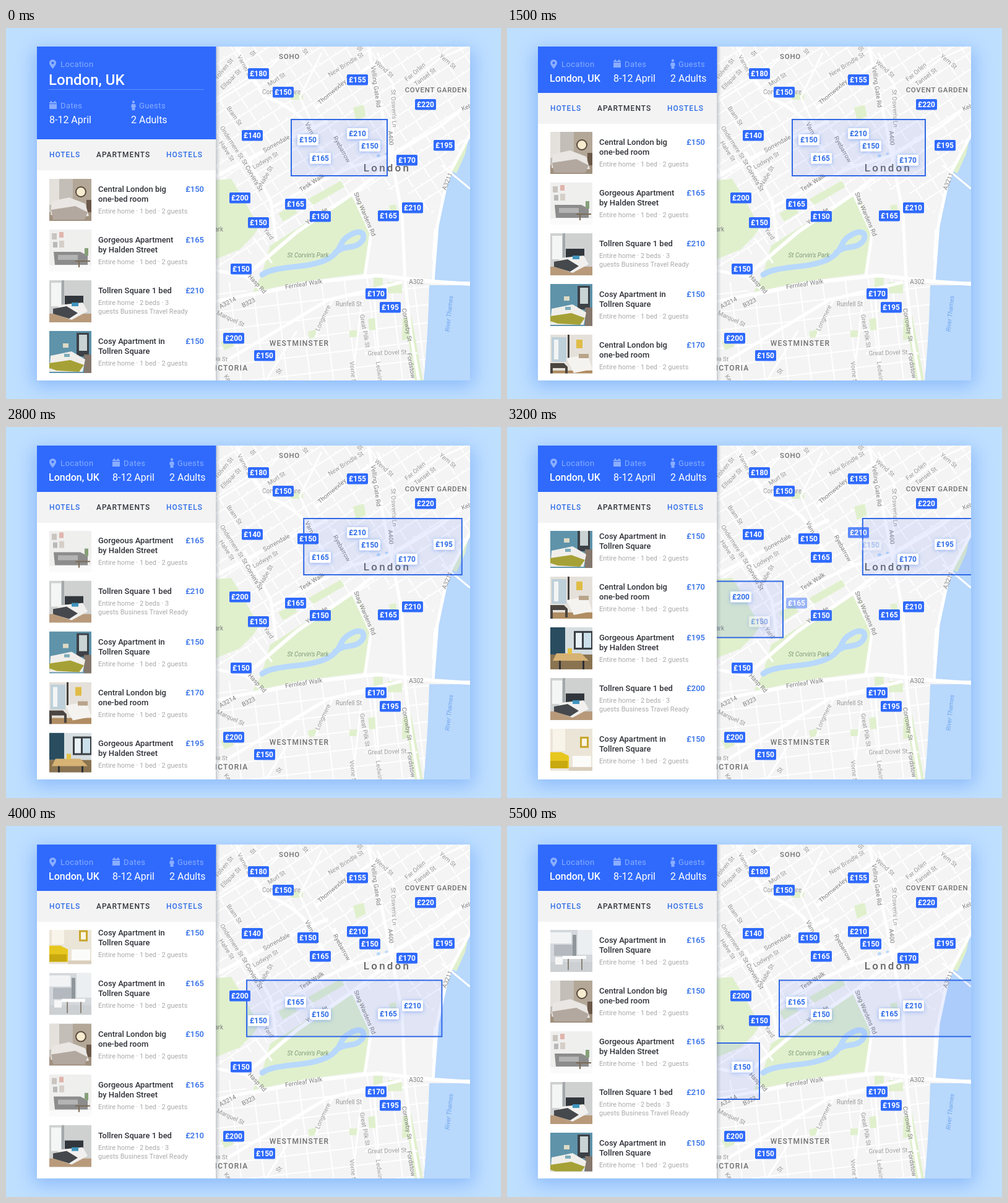
An HTML page for the animation above (5.6 s loop, 800 by 600 pixels).

```html
<!DOCTYPE html>
<html lang="en">
<head>
<meta charset="utf-8">
<title>Apartment search</title>
<style>
html, body { margin: 0; width: 100%; height: 100%; overflow: hidden; background: #bddcff; }
svg { display: block; width: 800px; height: 600px; font-family: Roboto, Inter, sans-serif; }
.street { font-size: 10px; fill: #9a9a9a; text-anchor: middle; }
.area { font-size: 11.5px; font-weight: 500; fill: #707070; letter-spacing: .7px; text-anchor: middle; }
.pill { font-size: 12px; font-weight: 700; text-anchor: middle; }
.tab { font-size: 12px; font-weight: 500; letter-spacing: 1px; fill: #2f6de8; }
.hint { font-size: 13px; fill: #8aadff; letter-spacing: .4px; }
.value { font-size: 16px; fill: #fff; }
.title { font-size: 13px; font-weight: 500; fill: #303238; }
.price { font-size: 13px; font-weight: 500; fill: #2f6de8; text-anchor: end; }
.meta { font-size: 11px; fill: #aaa; }
.road { fill: none; stroke: #fff; stroke-linejoin: round; }
</style>
</head>
<body>
<svg id="stage" viewBox="0 0 800 600">
  <defs>
    <filter id="glow" x="-20%" y="-20%" width="140%" height="140%"><feGaussianBlur stdDeviation="15"/></filter>
    <filter id="soft" x="-40%" y="-60%" width="180%" height="240%"><feDropShadow dx="0" dy="1" stdDeviation="3" flood-color="#3d74f5" flood-opacity=".5"/></filter>
    <linearGradient id="edge"><stop stop-color="#5a6478" stop-opacity=".3"/><stop offset="1" stop-color="#5a6478" stop-opacity="0"/></linearGradient>
    <pattern id="north" width="31" height="23" patternUnits="userSpaceOnUse" patternTransform="rotate(-33)"><path class="road" d="M0 4H31M9 4V23M22 4V-9" stroke-width="2"/></pattern>
    <pattern id="south" width="37" height="29" patternUnits="userSpaceOnUse" patternTransform="rotate(-7)"><path class="road" d="M0 5H37M12 0V29" stroke-width="2"/></pattern>
    <clipPath id="mapClip"><path d="M339 30H750V570H339Z"/></clipPath>
    <clipPath id="listClip"><rect id="listRect" x="50" width="289"/></clipPath>
    <clipPath id="thumbClip"><path d="M0 0H68V68H0Z"/></clipPath>
  </defs>
  <rect width="800" height="600" fill="#bfdfff"/>
  <rect x="44" y="34" width="712" height="546" fill="#6ba3f7" opacity=".6" filter="url(#glow)"/>
  <g clip-path="url(#mapClip)">
    <g id="map"></g>
    <g id="boxes"></g>
    <g id="pills"></g>
    <rect x="339" y="30" width="7" height="540" fill="url(#edge)"/>
  </g>
  <rect x="50" y="30" width="289" height="540" fill="#fff"/>
  <g clip-path="url(#listClip)"><g id="list"></g></g>
  <g id="tabs">
    <rect x="50" y="180" width="289" height="50" fill="#f3f3f3"/>
    <text class="tab" x="70" y="209">HOTELS</text>
    <text class="tab" x="146" y="209" style="fill:#33363d">APARTMENTS</text>
    <text class="tab" x="259" y="209">HOSTELS</text>
  </g>
  <rect id="head" x="50" y="30" width="289.500" fill="#2f6afd"/>
  <path id="rule" d="M69 99.500H320" stroke="#fff" stroke-opacity=".25"/>
  <path d="M75.500 51a5.500 5.500 0 0 0-5.500 5.500C70 60 75.500 66 75.500 66S81 60 81 56.500A5.500 5.500 0 0 0 75.500 51Zm0 3.500a2 2 0 1 1 0 4a2 2 0 0 1 0-4Z" fill="#8aadff"/>
  <text class="hint" x="88" y="63">Location</text>
  <text id="city" x="69" fill="#fff" font-weight="500">London, UK</text>
  <g id="dates">
    <path d="M70 121v-1h2v-2h2v2h4v-2h2v2h2v2H70ZM70 123H82V131H70Z" fill="#8aadff"/>
    <text class="hint" x="88" y="130">Dates</text>
    <text class="value" x="70" y="154">8-12 April</text>
  </g>
  <g id="guests">
    <path d="M206 117.500a2.200 2.200 0 1 1-.1 0ZM203 123H209L210 128H208.500V133H203.500V128H202Z" fill="#8aadff"/>
    <text class="hint" x="215" y="130">Guests</text>
    <text class="value" x="202" y="154">2 Adults</text>
  </g>
</svg>
<script>
const LOOP = 5600, LEFT = 339, SPAN = 411, PITCH = 82;
const BLUE = '#2f6afd';
const $ = id => document.getElementById(id);
const clamp = v => Math.max(0, Math.min(1, v));
const ramp = (t, a, b) => clamp((t - a) / (b - a));
const ease = p => p < .5 ? 4 * p ** 3 : 1 - 4 * (1 - p) ** 3;
const mix = (a, b, p) => a + (b - a) * p;

// A value that eases through moves of [start, end, target].
const track = (from, ...moves) => t => {
  let v = from;
  for (const [a, b, to] of moves) v = mix(v, to, ease(ramp(t, a, b)));
  return v;
};
const fold = track(0, [700, 1300, 1]);
const selStart = track(460, [1874, 2474, 480], [2740, 3830, 790], [3850, 4300, 850]);
const selEnd = track(617, [700, 1300, 677], [1874, 2474, 737], [2710, 3830, 1096], [3850, 4300, 1231]);
const scroll = track(0, [1874, 2474, PITCH], [2699, 3830, 7 * PITCH], [3850, 4300, 8 * PITCH]);

// ---- Map ----
const road = (w, d) => `<path class="road" stroke-width="${w}" d="${d}"/>`;
const area = (c, d) => `<path fill="${c}" d="${d}"/>`;
const street = (s, x, y, a = 0, style = '') =>
  `<text class="street" style="${style}" transform="translate(${x} ${y}) rotate(${a})" y="3.500">${s}</text>`;
const district = (s, x, y, style = '') => `<text class="area" style="${style}" x="${x}" y="${y}">${s}</text>`;
const GREEN = '#e0f0cd', WATER = '#b8d8fc', DARK = 'fill:#808080', WIDE = 'font-size:12px;letter-spacing:1.200px';

$('map').innerHTML = [
  area('#f4f4f4', 'M339 30H750V570H339Z'),
  area('url(#north)', 'M339 30H750V180L690 300 640 260 570 265 425 350 339 395Z'),
  area('url(#south)', 'M339 400L400 430 590 402 690 412 680 570H339Z'),
  area(GREEN, 'M339 246L364 244 377 265 409 322 398 338 378 358 339 374Z'),
  area(GREEN, 'M427 352L480 318 515 300 560 272 572 283 590 332 579 397 480 410 399 427 413 400Z'),
  area(GREEN, 'M488 277L541 247 547 257 497 286ZM440 300L464 287 471 299 448 313ZM561 129L578 124 582 142 566 150Z'),
  area(GREEN, 'M617 411H640V429H617ZM594 404H609V421H594ZM585 471L599 468 600 488 587 489ZM641 470L655 466 661 498 674 570H661L650 503 640 505Z'),
  area(GREEN, 'M555 489H570V500H555ZM488 491L500 488 503 499 490 502ZM460 106H480V116H460ZM347 508L365 501 368 515 353 521ZM619 287L630 285 632 299 622 300Z'),
  area(WATER, 'M750 178Q730 207 717 245 702 285 697 325L687 410H750ZM684 416H750V570H675Q682 500 684 416Z'),
  area(GREEN, 'M748 177L737 190 719 231 728 235 742 204Z'),
  '<path d="M414 399C436 383 488 390 519 374 546 360 536 345 556 335 583 319 585 347 562 353 547 356 546 354 532 363" fill="none" stroke="#b8d8fc" stroke-width="9" stroke-linecap="round"/>',
  '<circle cx="602" cy="207" r="3" fill="#b8d8fc"/><circle cx="615" cy="204" r="2.500" fill="#b8d8fc"/>',
  road(5, 'M372 30L396 75 420 112Q455 123 481 150L520 212M585 30L600 100 612 155 622 205M500 130L555 85 605 50'),
  road(6, 'M339 240L440 187 520 150M386 402L470 330 560 268 625 217M398 431L500 411 600 400 690 410 750 414'),
  road(5, 'M530 165L560 226M430 290L500 252 560 224 625 205 700 160 750 122M385 200L428 280 437 345'),
  road(5, 'M560 268L590 332 580 400M622 205L640 300 645 410 655 500 667 570M339 548L420 500 520 440 640 411'),
  road(5, 'M690 410L697 320 714 240 750 172M339 392L388 402 416 427M339 442L398 430'),
  road(3, 'M704 222L750 260M500 165L475 112 510 40M625 205V90L600 40M650 90L700 50 745 30M339 120L420 70 460 30'),
  road(3, 'M400 340L430 380M560 570L575 440M605 570L595 430M500 500L530 435M420 570L470 490M580 526H665M690 375L693 325'),
  street('Tolven St', 352, 66, -50), street('Varnel St', 386, 62, 62), street('Ellspar St', 363, 83, -45),
  street('Murl St', 437, 83, -33), street('Corvel Square', 445, 103), street('New Brindle St', 549, 59, -32),
  street('Wend St', 611, 66, 42), street('Far Orlen', 661, 71, -40), street('Tansel St', 677, 79, -38),
  street('Yem St', 714, 54, 40), street('St', 484, 38, 50), street('St', 572, 33, -42), street('St', 399, 41, -42),
  street('Thornwexley Av', 532, 99, -40, DARK), street('Velling Gate Rd', 598, 95, 82, DARK),
  street("St Oswen's Ln", 627, 130, 88), street('A400', 622, 178, 86, DARK), street('Kelwyn', 751, 125, -22, DARK),
  street('Bram St', 369, 142, 55), street('Ondermere St', 365, 185, 57), street('Halve St', 357, 199, 57),
  street('Sorrendale', 437, 187, -29, DARK), street('Varnel St', 495, 171, 63, DARK), street('Ryebarrow', 543, 196, 61, DARK),
  street('Lodwyn St', 419, 214, -30), street('Nabe St', 420, 239, -60), street("St Corvin's St", 398, 238, 60, DARK),
  street('Tesk Walk', 494, 250, -33, DARK), street('Yew Ride', 502, 304, -35, DARK), street('Elm Yard', 419, 325, 55),
  street('Stag Wardens Rd', 580, 301, 67, DARK), street('Fernleaf Walk', 481, 414, -9, DARK), street('Hasp Rd', 406, 414, 47, DARK),
  street('Park', 341, 325, 0, DARK), street('A302', 663, 410, 0, DARK), street('A3211', 713, 248, -68, DARK),
  street('A3214', 358, 444, -28, DARK), street('B323', 392, 444, -27, DARK), street('Marquel St', 363, 470, 25),
  street('Longmere', 512, 469, -65), street('Runfell St', 554, 446), street('Great Pilk St', 580, 490, 80),
  street('Great Dovel St', 616, 525, -2), street('Corrowby St', 648, 480, 80, DARK), street('Fordstow', 655, 546, 80, DARK),
  street('Ledwin St', 604, 561, 83), street('Vorne St', 561, 558, 84), street('na St', 347, 535, 4), street('Ke', 358, 566, 50), street('St', 441, 555, -55),
  street("St Corvin's Park", 488, 367, 0, 'fill:#7f9a78;font-style:italic'),
  street('River Thames', 716, 462, -84, 'fill:#6ea5ec;font-style:italic'),
  district('SOHO', 458, 50), district('COVENT GARDEN', 695, 104), district('WESTMINSTER', 474, 514, WIDE),
  district('VICTORIA', 360, 554, WIDE), district('London', 616, 232, 'font-size:17px;letter-spacing:3.200px;fill:#666')
].join('');

// ---- Price pills: price, x, y, selection row (-1 = never selected) ----
const pills = `180 408 74 -1|150 448 104 -1|155 568 84 -1|220 678 124 -1|140 398 174 -1|150 488 181 0
165 508 211 0|210 568 171 0|150 588 191 0|170 648 214 0|195 708 190 0|200 378 275 1|165 468 285 1|150 408 315 1
150 508 305 1|165 618 304 1|210 657 291 1|150 380 390 2|170 598 430 -1|195 621 452 -1|200 368 502 -1|150 418 530 -1`
  .split(/[|\n]/).map(s => s.trim().split(' ').map(Number));

const reach = (fn, v) => {
  if (fn(0) >= v) return -1e4;
  for (let t = 0; t < LOOP; t += 5) if (fn(t) >= v) return t;
  return 1e5;
};
const pill = (price, x, y, bg, ink, extra) =>
  `<g transform="translate(${x} ${y})"><rect x="-17" y="-9" width="34" height="17.500" rx="2" fill="${bg}" ${extra}/>
   <text class="pill" y="4" fill="${ink}">£${price}</text></g>`;
const marks = pills.map(([price, x, y, row]) => {
  const g = document.createElementNS('http://www.w3.org/2000/svg', 'g');
  g.innerHTML = pill(price, x, y, BLUE, '#fff', '') + pill(price, x, y, '#fff', '#2f6de8', 'filter="url(#soft)"');
  $('pills').append(g);
  const c = x + row * SPAN;
  return {
    off: g.children[0], on: g.children[1],
    enter: row < 0 ? 1e5 : reach(selEnd, c),
    leave: row < 0 ? 1e5 : reach(selStart, c - 12)
  };
});

// ---- List ----
const box = (c, x, y, w, h) => `<rect x="${x}" y="${y}" width="${w}" height="${h}" fill="${c}"/>`;
const rooms = {
  bed: box('#c3beb7', 0, 0, 68, 68) + box('#e4e1dc', 0, 0, 16, 42) + box('#b3a798', 38, 0, 30, 42) + box('#6b5848', 60, 34, 8, 34) +
    '<circle cx="51" cy="21" r="8" fill="#f7ecd0" stroke="#5b4a3c" stroke-width="2"/>' + box('#a0917f', 0, 54, 68, 14) +
    area('#e9e6e3', 'M4 36L32 30 58 40 64 60 30 64 2 58Z') + area('#b3a89f', 'M3 50L42 44 62 54 57 66 6 66Z'),
  sofa: box('#efefee', 0, 0, 68, 68) + box('#c9c4c0', 4, 6, 8, 10) + box('#e0b4ac', 16, 4, 7, 9) + box('#b9b9b9', 6, 20, 7, 9) + box('#d5cfc8', 16, 18, 8, 11) +
    area('#8c8c8c', 'M7 36H50L62 42V57H9Z') + area('#b4b4b4', 'M14 41H46V49H14Z') + box('#fafafa', 0, 58, 68, 10) +
    box('#7b6a55', 42, 50, 24, 2) + box('#7b6a55', 47, 52, 2, 9) + box('#86a078', 57, 30, 6, 12),
  loft: box('#cfd1d1', 0, 0, 68, 68) + box('#f4f6f6', 3, 4, 16, 38) + box('#a3a9ab', 20, 0, 4, 40) + box('#30363b', 25, 25, 30, 14) + box('#b89a7b', 0, 54, 68, 14) +
    area('#f1f0ee', 'M16 40L54 36 62 50 36 64 8 54Z') + area('#45484c', 'M6 46L28 42 46 53 32 62 6 54Z') + box('#3f94bd', 36, 36, 11, 6),
  blue: box('#5e93aa', 0, 0, 68, 68) + box('#3c4147', 44, 3, 20, 38) + box('#c9d3d4', 48, 6, 13, 26) + box('#85776c', 56, 38, 12, 30) + box('#ded9c4', 22, 20, 9, 7) +
    area('#f0eeea', 'M2 40L36 33 58 46 54 66 0 66Z') + area('#a6a136', 'M0 52L34 47 56 55 48 66 12 64 0 60Z') + box('#7dabb9', 24, 37, 9, 5),
  desk: box('#e5e1da', 0, 0, 68, 68) + box('#bed0da', 2, 4, 24, 40) + box('#f3f5f5', 6, 8, 7, 32) + box('#e0bc47', 42, 8, 10, 14) + box('#44413e', 28, 0, 3, 42) +
    box('#b08d62', 0, 58, 68, 10) + area('#f5f3f0', 'M26 38L60 32 68 56 38 62Z') + area('#4a4541', 'M0 46H22L28 52V66H24V54H4V68H0Z') + box('#b9a48a', 46, 31, 16, 7),
  dining: box('#d5dde0', 0, 0, 68, 68) + box('#294c5f', 0, 0, 24, 44) + box('#3a3f44', 38, 6, 30, 30) + box('#e9f2f7', 41, 9, 10, 24) + box('#cbe0ea', 54, 9, 12, 24) +
    box('#8a7351', 0, 44, 68, 24) + area('#d6b274', 'M10 42H50L62 54H4Z') + box('#2d3034', 14, 54, 3, 14) + box('#2d3034', 52, 54, 3, 14) + box('#e5c447', 28, 34, 7, 9),
  lemon: box('#ebe5d8', 0, 0, 68, 68) + box('#f8f4ea', 4, 0, 20, 36) + box('#c8a62c', 48, 13, 14, 18) + box('#faf5e3', 51, 16, 8, 12) +
    area('#e7c71e', 'M0 38H18L30 44V64H0Z') + area('#c8a90f', 'M0 52H28V64H0Z') + box('#fbfbf9', 36, 44, 30, 18) + box('#d9cdbb', 30, 62, 38, 6),
  kitchen: box('#d4d8dc', 0, 0, 68, 68) + box('#f1f3f5', 0, 4, 34, 18) + box('#b4b9bf', 6, 24, 30, 18) + box('#eceff1', 44, 0, 24, 40) + box('#8f969c', 36, 8, 6, 34) +
    box('#ccd0d3', 0, 52, 68, 16) + box('#fff', 20, 42, 38, 5) + box('#8b8378', 28, 47, 2, 18) + box('#8b8378', 50, 47, 2, 18) + box('#f7f7f7', 8, 44, 12, 12)
};
const titles = [
  ['Central London big', 'one-bed room'], ['Gorgeous Apartment', 'by Halden Street'],
  ['Tollren Square 1 bed'], ['Cosy Apartment in', 'Tollren Square']
];
const flats = [
  [0, 150, 'bed'], [1, 165, 'sofa'], [2, 210, 'loft'], [3, 150, 'blue'], [0, 170, 'desk'], [1, 195, 'dining'],
  [2, 200, 'loft'], [3, 150, 'lemon'], [3, 165, 'kitchen'],
  [0, 150, 'bed'], [1, 165, 'sofa'], [2, 210, 'loft'], [3, 150, 'blue']
];
const line = (cls, x, y, s) => `<text class="${cls}" x="${x}" y="${y}">${s}</text>`;
$('list').innerHTML = flats.map(([kind, price, room], i) => {
  const [a, b] = titles[kind];
  const text = b
    ? line('title', 149, 37, b) + line('meta', 149, 56, 'Entire home · 1 bed · 2 guests')
    : line('meta', 149, 40, 'Entire home · 2 beds · 3') + line('meta', 149, 54, 'guests Business Travel Ready');
  return `<g transform="translate(0 ${i * PITCH})"><g transform="translate(70 0)" clip-path="url(#thumbClip)">${rooms[room]}</g>
    ${line('title', 149, 21, a)}${text}${line('price', 320, 21, '£' + price)}</g>`;
}).join('');

$('boxes').innerHTML = '<rect fill="#5470f5" fill-opacity=".12" stroke="#3069e6" stroke-width="2" height="91"/>'.repeat(3);
const boxes = [...$('boxes').children];

const set = (el, attrs) => { for (const k in attrs) el.setAttribute(k, attrs[k]); };
const move = (id, x, y) => set($(id), { transform: `translate(${x} ${y})` });

function draw(t) {
  const f = fold(t), top = mix(244, 168, f);
  set($('head'), { height: mix(150, 75, f) });
  set($('rule'), { opacity: 1 - clamp(f * 2) });
  set($('city'), { y: mix(92, 87, f), 'font-size': mix(24, 16, f) });
  move('dates', 102 * f, -67 * f);
  move('guests', 62 * f, -67 * f);
  move('tabs', 0, -75 * f);
  set($('listRect'), { y: top, height: 558.5 - top });
  move('list', 0, top - scroll(t));

  // The selection wraps from one map row to the next, like selected text.
  const a = selStart(t), b = selEnd(t);
  boxes.forEach((el, row) => set(el, { x: a - row * SPAN + 1, y: 148 + row * 101.5, width: b - a - 2 }));

  for (const m of marks) {
    const lit = ramp(t, m.enter - 78, m.enter + 103) * (1 - ramp(t, m.leave - 27, m.leave + 38));
    set(m.off, { opacity: clamp(1 - 2 * lit) });
    set(m.on, { opacity: clamp(2 * lit - 1) });
  }
}

const begin = performance.now();
function tick() {
  draw((performance.now() - begin) % LOOP);
  requestAnimationFrame(tick);
}
draw(0);
requestAnimationFrame(tick);
</script>
</body>
</html>
```
